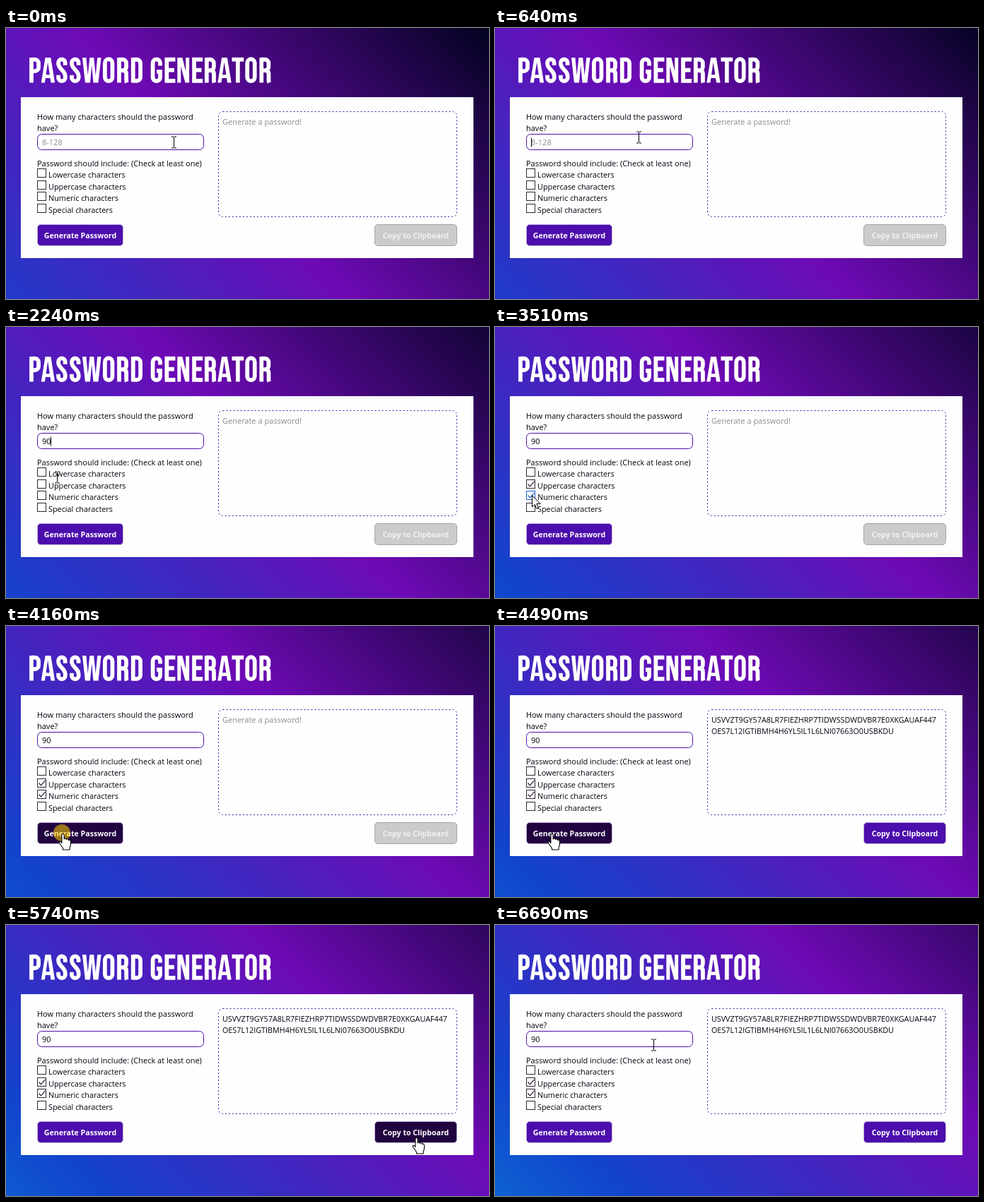
Recreate the animation shown at these times as an HTML page. Size 683 by 384 pixels, loop 7.01 s.

```html
<!DOCTYPE html>
<html lang="en">
<head>
<meta charset="utf-8">
<title>Password generator</title>
<style>
  html, body { margin: 0; width: 100%; height: 100%; overflow: hidden; background: #3a1ab0; }
  svg { display: block; width: 100%; height: 100%; }
  text { font: 11px "Open Sans", "Noto Sans", sans-serif; fill: #06010f; white-space: pre; }
  .hint { fill: #8c8a92; }
  #options text { font-size: 10.85px; }
  #output { font-size: 10.75px; }
  #output text { font-size: inherit; }
  #output .hint { font-size: 11px; }
  .btn text { font-weight: 700; font-size: 10.6px; fill: #fff; text-anchor: middle; }
  .box { fill: #fff; stroke: #2c2930; }
  .tick { fill: none; stroke: #2c1535; stroke-width: 1.2; }
  .hover .box, .hover .tick { stroke: #1c62d2; }
</style>
</head>
<body>
<svg id="stage" viewBox="0 0 683 384" preserveAspectRatio="none">
  <defs>
    <linearGradient id="sky" gradientUnits="userSpaceOnUse" x1="-585" y1="585" x2="292.5" y2="-292.5">
      <stop offset="0" stop-color="#06a0de"/>
      <stop offset=".3333" stop-color="#1144cc"/>
      <stop offset=".6667" stop-color="#6e0ab5"/>
      <stop offset="1" stop-color="#02031f"/>
    </linearGradient>
  </defs>
  <rect width="683" height="384" fill="url(#sky)"/>
  <g id="heading" role="img" aria-label="Password Generator" transform="translate(31.1 42) scale(.0507)"/>
  <rect x="21" y="98" width="640" height="228" fill="#fefefe"/>

  <text x="44" y="130">How many characters should the password</text>
  <text x="44" y="146">have?</text>
  <rect x="44.5" y="150.5" width="235" height="22" rx="6" fill="#fff" stroke="#4a10a8"/>
  <text id="count" x="51" y="166"/>
  <path id="caret" d="M0 155.5V168.5" stroke="#000"/>
  <text x="44" y="196">Password should include: (Check at least one)</text>
  <g id="options"/>

  <rect x="300.5" y="118.5" width="337" height="149" rx="6" fill="none" stroke="#4a10a8" stroke-dasharray="2 3"/>
  <g id="output">
    <text id="line1" x="306" y="137"/>
    <text id="line2" x="306" y="153"/>
  </g>

  <g class="btn">
    <rect id="make" x="44.5" y="278.5" width="121" height="30" rx="4.5" stroke="#bfb0d8"/>
    <text x="105" y="298">Generate Password</text>
  </g>
  <g class="btn">
    <rect id="copy" x="521.5" y="278.5" width="116" height="30" rx="4.5"/>
    <text id="copyLabel" x="579.5" y="298">Copy to Clipboard</text>
  </g>

  <circle id="click" r="12" fill="#ffd400" opacity=".55"/>
  <path id="cursor"/>
</svg>
<script>
const $ = id => document.getElementById(id);
const LOOP = 7010;

// Condensed capitals, 700 units tall; "solid" ones are filled, the rest stroked.
const STEM = 'M96 0V700';
const bowl = (right, top, bottom) =>
  `M96 ${top}H${right - 100}a100 100 0 0 1 100 100V${bottom - 100}a100 100 0 0 1 -100 100H96`;
const GLYPHS = {
  P: { w: 356, d: STEM + bowl(295, 53, 375) },
  D: { w: 393, d: STEM + bowl(300, 53, 647) },
  R: { w: 390, d: STEM + bowl(295, 53, 358) + 'M200 358Q297 362 297 455V610Q297 672 307 700' },
  O: { w: 392, d: 'M92 148a104 104 0 0 1 208 0V552a104 104 0 0 1 -208 0Z' },
  G: { w: 386, d: 'M298 225V148a103 103 0 0 0 -206 0V552a103 103 0 0 0 206 0V392H200' },
  S: { w: 373, d: 'M281 212V140a95 95 0 0 0 -190 0V165C91 330 283 345 283 520V560a96 96 0 0 1 -192 0V488' },
  E: { w: 350, d: 'M334 53H96V647H334M96 347H302' },
  T: { w: 346, d: 'M10 53H340M175 53V700' },
  N: { w: 413, solid: 1, d: 'M41 0H179L275 380V0H373V700H260L139 247V700H41Z' },
  A: { w: 400, solid: 1, d: 'M12 700L126 0H280L394 700H283L264 573H131L113 700ZM145 478H249L197 130Z' },
  W: { w: 552, solid: 1, d: 'M14 0L93 700H231L276 215L321 700H459L538 0H434L385 497L333 0H219L167 497L122 0Z' }
};

function lettering(words) {
  let x = 0, out = '';
  for (const ch of words) {
    const g = GLYPHS[ch];
    if (!g) { x += 160; continue; }
    const paint = g.solid ? 'fill="#fff" fill-rule="evenodd"' : 'fill="none" stroke="#fff" stroke-width="113"';
    out += `<path transform="translate(${x})" d="${g.d}" ${paint}/>`;
    x += g.w;
  }
  return out;
}

const OPTIONS = [['Lowercase', 199], ['Uppercase', 216], ['Numeric', 232], ['Special', 249]];

const CURSORS = {
  beam: { d: 'M-3.5 -7.5H-.5M.5 -7.5H3.5M0 -7V8M-3.5 8.5H-.5M.5 8.5H3.5', fill: 'none', width: 1 },
  arrow: { d: 'M0 0V16.5L3.8 13L6.3 19L8.8 18L6.3 12H11.5Z', fill: '#fff', width: 1 },
  hand: {
    d: 'M-1.6 1.6Q-1.6 0 0 0Q1.7 0 1.7 1.8V7.5Q2 6.3 3.6 6.5Q5 6.7 5 8Q5.4 7 6.8 7.3Q8.2 7.6 8.2 9' +
       'Q9 8.3 10 8.8Q11 9.3 11 11V15Q11 17 9.6 19V22.5H0V20.5Q-2 17 -5 13Q-6 11.2 -4.6 10.7Q-3.4 10.4 -1.6 13Z',
    fill: '#fff', width: 1.1
  }
};

// start time, pointer shape, hotspot
const STEPS = [
  [0, 'beam', 237, 161], [310, 'beam', 216, 157], [640, 'beam', 203, 154],
  [980, 'beam', 196, 158], [1290, 'beam', 188, 162], [1610, 'beam', 168, 166],
  [1920, 'beam', 118, 188], [2240, 'beam', 72, 212], [2560, 'arrow', 55, 219],
  [2870, 'arrow', 51, 222], [3180, 'arrow', 51, 230], [3510, 'arrow', 52, 238],
  [3830, 'hand', 79, 289], [4160, 'hand', 80, 294], [4490, 'hand', 80, 294],
  [4810, 'hand', 80, 294], [5120, 'arrow', 162, 273], [5430, 'arrow', 372, 307],
  [5740, 'hand', 580, 301], [6060, 'hand', 580, 301], [6380, 'hand', 580, 301],
  [6690, 'beam', 224, 169]
];

$('heading').innerHTML = lettering('PASSWORD GENERATOR');
$('options').innerHTML = OPTIONS.map(([name, y]) => `<g>
  <rect class="box" x="44.5" y="${y + .5}" width="12" height="12"/>
  <path class="tick" d="M46.5 ${y + 6.5}l3 3.3l6 -7"/>
  <text x="60" y="${y + 13}">${name} characters</text></g>`).join('');
const rows = [...$('options').children];

function attrs(el, map) {
  for (const key in map) el.setAttribute(key, map[key]);
}

function hintText(el, value, hint) {
  el.textContent = value || hint;
  el.setAttribute('class', value ? '' : 'hint');
}

function draw(ms) {
  const [t, shape, x, y] = STEPS.filter(s => s[0] <= ms).pop();
  const within = (from, to) => t >= from && t < to;

  const s = t / 1000;
  const drift = (100 + 35.2 * s + 1.2 * s * s) / 2;
  $('sky').setAttribute('gradientTransform', `translate(${drift} ${-drift})`);

  const typed = t < 1290 ? '' : t < 1610 ? '9' : '90';
  hintText($('count'), typed, '8-128');
  attrs($('caret'), {
    transform: `translate(${51.5 + typed.length * 6})`,
    visibility: within(640, 2560) ? 'visible' : 'hidden'
  });

  const checked = [false, t >= 2870, t >= 3510, false];
  const hovered = [false, within(2870, 3180), within(3510, 3830), false];
  rows.forEach((row, i) => {
    row.setAttribute('class', hovered[i] ? 'hover' : '');
    row.children[1].setAttribute('visibility', checked[i] ? 'visible' : 'hidden');
  });

  const done = t >= 4490;
  hintText($('line1'), done && 'USVVZT9GY57A8LR7FIEZHRP7TIDWSSDWDVBR7E0XKGAUAF447', 'Generate a password!');
  $('line2').textContent = done ? 'OES7L12IGTIBMH4H6YL5IL1L6LNI07663O0USBKDU' : '';

  const base = '#4c0eac', dark = '#21033f';
  $('make').setAttribute('fill', within(3830, 5120) ? dark : base);
  attrs($('copy'), {
    fill: !done ? '#cbcbcb' : within(5740, 6690) ? dark : base,
    stroke: done ? '#bfb0d8' : '#a8a3aa'
  });
  $('copyLabel').style.fill = done ? '#fff' : '#f1f1f1';

  attrs($('click'), {
    cx: x - 1, cy: y - 1,
    visibility: t === 4160 || t === 6060 ? 'visible' : 'hidden'
  });
  const c = CURSORS[shape];
  attrs($('cursor'), {
    d: c.d, fill: c.fill, stroke: '#000', 'stroke-width': c.width,
    'stroke-linejoin': 'round', transform: `translate(${x + .5} ${y + .5})`
  });
}

const start = performance.now();
function tick() {
  draw((performance.now() - start) % LOOP);
  requestAnimationFrame(tick);
}
tick();
</script>
</body>
</html>
```
